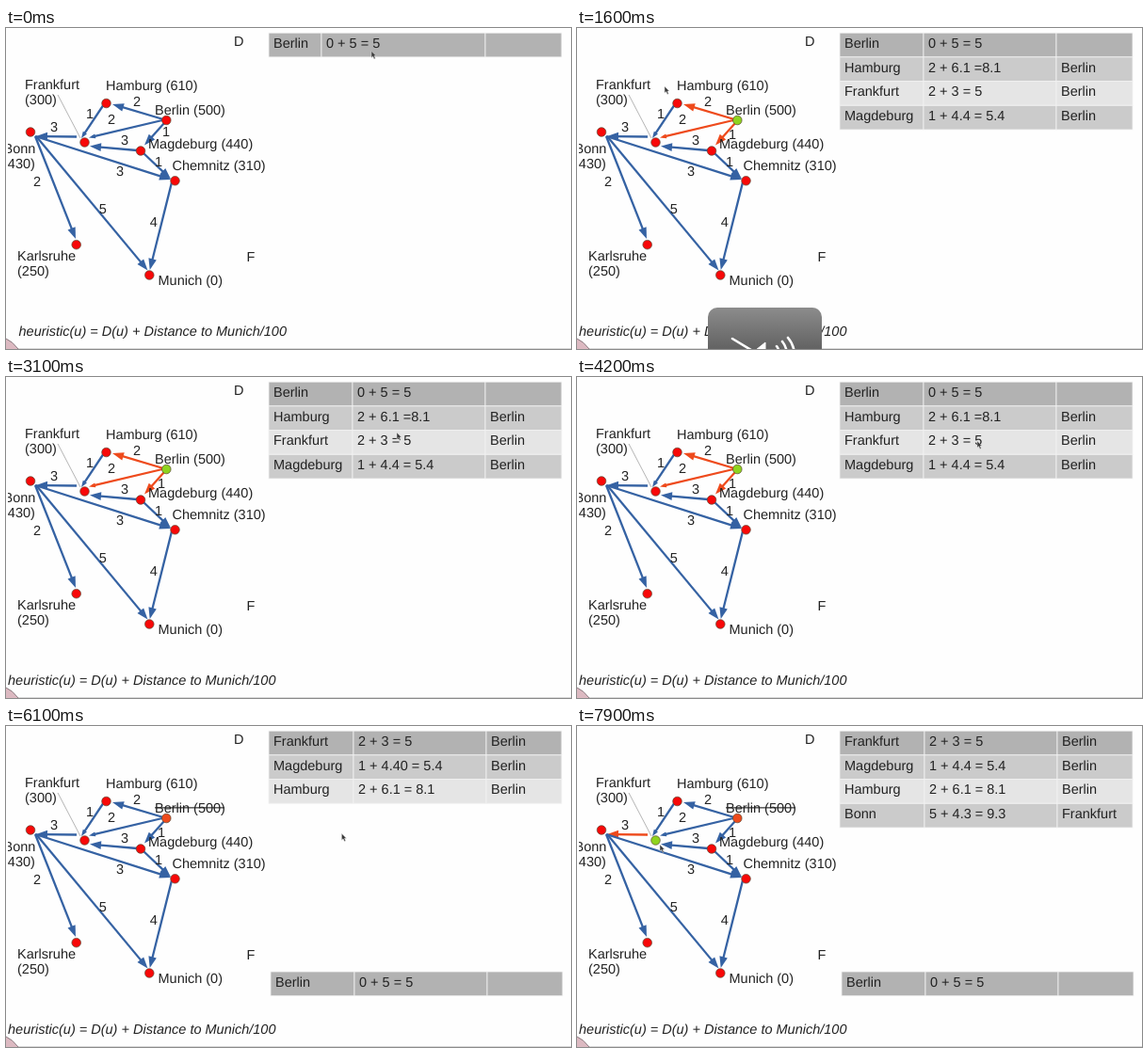
Animation of 600x341 px, one loop 8000 ms. Source, as an HTML page:

```html
<!DOCTYPE html>
<html lang="en">
<head>
<meta charset="utf-8">
<title>Best-first route search</title>
<style>
  html, body { margin: 0; width: 100%; height: 100%; overflow: hidden; background: #fefefe; }
  svg { display: block; font: 14.5px "Liberation Sans", Arial, sans-serif; fill: #222; text-rendering: geometricPrecision; }
  .mid { text-anchor: middle; }
</style>
</head>
<body>
<svg id="stage" width="600" height="341" viewBox="0 0 600 341"></svg>
<script>
const LOOP = 8000, STEP = 100;
const BLUE = '#3562a3', ORANGE = '#ee4a1c', GREEN = '#8fd41f', RED = '#f80808';

const nodes = {
  hamburg: [106.5, 80], berlin: [170.3, 98], frankfurt: [83.5, 121.5], magdeburg: [143, 130.5],
  bonn: [26, 110.5], chemnitz: [179.5, 162.3], karlsruhe: [74.7, 230.2], munich: [152.3, 262.5]
};
// x1, y1, x2, y2, optional head length
const edges = {
  bh: [167, 97, 113, 81], bf: [166, 98, 88, 116.5, 7], bm: [168, 101, 147, 124.5],
  hf: [103, 82.5, 80, 117, 7], mf: [139, 130, 89, 125.5], fb: [75, 115.5, 32, 115],
  bc: [31, 115, 175, 161], bk: [31, 115, 74, 224], bu: [32, 115, 150.5, 257.5],
  mc: [146, 133, 175, 160.5], cu: [176, 164, 152.7, 257]
};
const labels = [
  ['Hamburg (610)', 106, 66], ['Frankfurt', 20, 65], ['(300)', 20, 81], ['Berlin (500)', 158, 91.5],
  ['Magdeburg (440)', 151, 128], ['Chemnitz (310)', 176.5, 151], ['Bonn', -2.5, 132.7], ['(430)', -3, 148.5],
  ['Karlsruhe', 12, 247], ['(250)', 12, 263], ['Munich (0)', 161.5, 273], ['D', 242, 19], ['F', 255.5, 248]
];
const weights = [
  [2, 139, 83], [1, 89, 96], [2, 112, 102], [3, 51, 110], [3, 126, 124], [1, 162, 147],
  [3, 121, 156.5], [2, 33, 168], [5, 102.7, 197], [4, 156.7, 211]
];

const hamburg = ['Hamburg', '2 + 6.1 = 8.1', 'Berlin'];
const frankfurt = ['Frankfurt', '2 + 3 = 5', 'Berlin'];
const magdeburg = ['Magdeburg', '1 + 4.4 = 5.4', 'Berlin'];
const start = ['Berlin', '0 + 5 = 5', ''];
const slides = [
  { at: 0, rows: [start], cols: [279, 335, 509, 590] },
  { at: 1100, rows: [start, ['Hamburg', '2 + 6.1 =8.1', 'Berlin'], frankfurt, magdeburg],
    cols: [279, 368, 509, 590], hot: ['bh', 'bf', 'bm'], paint: { berlin: GREEN } },
  { at: 5800, rows: [frankfurt, ['Magdeburg', '1 + 4.40 = 5.4', 'Berlin'], hamburg],
    cols: [279, 369, 510, 590], paint: { berlin: ORANGE }, done: true },
  { at: 7600, rows: [frankfurt, magdeburg, hamburg, ['Bonn', '5 + 4.3 = 9.3', 'Frankfurt']],
    cols: [279, 369, 510, 590], hot: ['fb'], paint: { berlin: ORANGE, frankfurt: GREEN }, done: true }
];

// time, x, y of the pointer tip
const pointer = [
  [0, 388, 24.5], [700, 388, 24.5], [1500, 93, 62], [1700, 93, 62], [2400, 370, 72], [2800, 438, 66],
  [3100, 415, 59], [3500, 438, 62], [4200, 425, 68], [4700, 440, 88], [5100, 443, 98], [5600, 443, 98],
  [6000, 364, 110], [6900, 144, 232], [7000, 141, 236], [7300, 141, 236], [7800, 92, 128], [7900, 88, 126]
];

const text = (s, x, y, extra = '') => `<text x="${x}" y="${y}" ${extra}>${s}</text>`;
const rect = (x, y, w, h, fill, extra = '') =>
  `<rect x="${x}" y="${y}" width="${w}" height="${h}" fill="${fill}" ${extra}/>`;

function arrow([x1, y1, x2, y2, head = 12], color) {
  const angle = Math.atan2(y2 - y1, x2 - x1) * 180 / Math.PI;
  const length = Math.hypot(x2 - x1, y2 - y1);
  return `<g transform="translate(${x1} ${y1}) rotate(${angle})" fill="${color}">
    ${rect(0, -1.15, length - head / 2, 2.3, color)}
    <path d="M${length} 0l${-head} ${-head * .36}v${head * .72}z"/></g>`;
}

function table(rows, cols, top) {
  const shades = ['#b2b2b2', '#cbcbcb', '#e5e5e5', '#cbcbcb'], height = 25.7;
  return rows.map((row, r) => row.map((cell, c) => {
    const x = cols[c], y = top + r * height;
    return rect(x, y, cols[c + 1] - x, height, shades[r], 'stroke="#f2f2f2" stroke-width=".8"') +
      text(cell, x + 5, y + 15.7);
  }).join('')).join('');
}

function drawSlide({ rows, cols, hot = [], paint = {}, done, at }) {
  let out = '<path d="M55 71L79 117" stroke="#b5b5b5"/>';
  for (const id in edges) out += arrow(edges[id], hot.includes(id) ? ORANGE : BLUE);
  for (const id in nodes) {
    const [x, y] = nodes[id];
    out += `<circle cx="${x}" cy="${y}" r="4.8" fill="${paint[id] || RED}" stroke="#5b4a35" stroke-width=".7"/>`;
  }
  out += labels.map(l => text(...l)).join('');
  out += rect(0, 118, 2, 36, '#fefefe');
  const first = at ? [1, 165, 118] : [1, 170, 115];
  out += [...weights, first].map(w => text(...w, 'class="mid"')).join('');
  if (done) out += rect(158, 86.3, 74, 1.1, '#222') + table([start], [281, 370, 511, 591], 261);
  out += table(rows, cols, 5.2);
  out += text('heuristic(u) = D(u) + Distance to Munich/100', at ? 2 : 13.5, 327, 'font-style="italic"');
  return out + rect(0, 340, 600, 1, '#d8d8d8') +
    '<path d="M0 330Q7 333 13 341H0z" fill="#dcb9c1"/><path d="M0 330Q7 333 13 341" fill="none" stroke="#8a7b80"/>';
}

function muteBadge(opacity) {
  return `<linearGradient id="shade" x2="0" y2="1">
      <stop stop-color="#8c8c8c"/><stop offset=".7" stop-color="#646464"/></linearGradient>
    <g opacity="${opacity}">${rect(139, 297, 121, 60, 'url(#shade)', 'rx="10"')}
    <g fill="none" stroke="#fff" stroke-width="2.6" stroke-linecap="round">
      <path d="M165 330L198 350M212 338q3 4 3 10M218 333q5 6 5 15M224 329q7 8 7 20"/>
      <path d="M190 342L200 334V348" fill="#fff" stroke-width="1"/></g></g>`;
}

function pointerAt(t) {
  const i = pointer.findIndex(k => k[0] > t);
  if (i < 0) return pointer[pointer.length - 1].slice(1);
  const [t0, x0, y0] = pointer[i - 1], [t1, x1, y1] = pointer[i];
  const p = (t - t0) / (t1 - t0), e = p * p * (3 - 2 * p);
  return [x0 + (x1 - x0) * e, y0 + (y1 - y0) * e];
}

const stage = document.getElementById('stage');
const drawings = slides.map(drawSlide);
let shown = -1;

function frame(now) {
  const t = Math.floor(now % LOOP / STEP) * STEP;
  if (t !== shown) {
    shown = t;
    const index = slides.filter(s => s.at <= t).length - 1;
    const badge = t >= 1300 ? Math.min(1, Math.max(0, (2200 - t) / 300)) : 0;
    const [x, y] = pointerAt(t);
    stage.innerHTML = drawings[index] + (badge ? muteBadge(badge) : '') +
      `<path transform="translate(${x} ${y})" d="M0 0V7L1.6 5.6L3 8.4L4.2 7.8L3 5.1H5z"
        fill="#3a3a3a" stroke="#ddd" stroke-width=".5"/>`;
  }
  requestAnimationFrame(frame);
}
requestAnimationFrame(frame);
</script>
</body>
</html>
```
